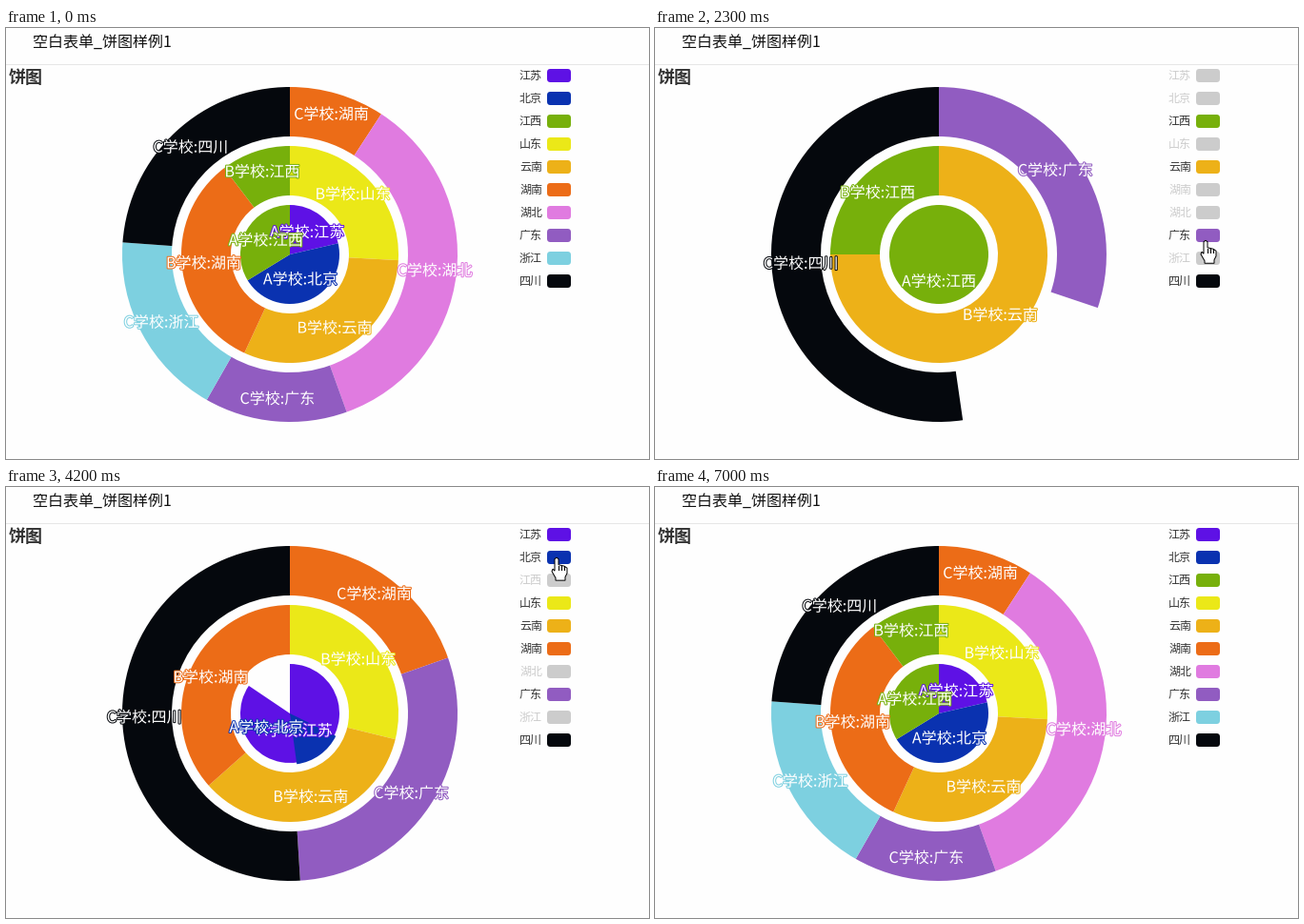
These frames come from a looping animation (675x453 px, 7.5 s). A matplotlib script:

```python
from itertools import groupby

import numpy as np
import matplotlib.pyplot as plt
from matplotlib.animation import FuncAnimation
from matplotlib.patches import FancyBboxPatch, Polygon, Wedge
from matplotlib.patheffects import Normal, Stroke

W, H, DPI = 675, 453, 72          # at 72 dpi one point is one pixel
STEP, LOOP = 100, 7500
CX, CY = 298, 238
DURATION = 300                    # of a pie update and of a hover swell
LAG = 60                          # delay of the hover behind the pointer
ENTER, LEAVE = 100, 7000
GREY = "#cccccc"

COLORS = {
    "江苏": "#5e11e5", "北京": "#0a32b0", "江西": "#77b00b", "山东": "#ebe818",
    "云南": "#edb118", "湖南": "#ec6c17", "湖北": "#e07be0", "广东": "#915cc1",
    "浙江": "#7dd0e0", "四川": "#05080d",
}
NAMES = list(COLORS)

# one pie per school, from the inside out
PIES = {
    "A学校": {"江苏": 77, "北京": 161.5, "江西": 121.5},
    "B学校": {"山东": 250, "云南": 300, "湖南": 317, "江西": 100},
    "C学校": {"湖南": 200, "湖北": 770, "广东": 300, "浙江": 390, "四川": 520},
}

# legend clicks, each toggling one name; the pointer and hovers follow from them
CLICKS = [
    (560, "江苏"), (1172, "北京"), (1480, "山东"), (1700, "湖南"), (1940, "湖北"),
    (2245, "浙江"), (2650, "湖南"), (2880, "山东"), (3100, "江西"), (3650, "江苏"),
    (4175, "北京"), (4720, "江西"), (5750, "湖北"), (6560, "浙江"),
]

ARROW = [(0, 0), (0, 16.5), (4, 13), (6.6, 19), (9, 18), (6.4, 12.2), (11.5, 12)]
HAND = [(-2, 1), (0, -0.5), (2, 1), (2, 7), (8, 8.5), (11, 10.5), (11, 16), (9, 20),
        (9, 23.5), (-1, 23.5), (-1, 21), (-5, 14), (-4, 11.5), (-2, 13.5)]


def cubic_out(k):
    return 1 - (1 - min(max(k, 0), 1)) ** 3


def elastic_out(k):
    if k <= 0 or k >= 1:
        return float(k >= 1)
    return 1 + 2 ** (-10 * k) * np.sin((k - 0.1) * 2 * np.pi / 0.4)


def lift(color):
    rgb = [int(color[i:i + 2], 16) for i in (1, 3, 5)]
    return tuple(min(c * 1.1, 255) / 255 for c in rgb)


def row_y(name):
    return 50 + 24 * NAMES.index(name)


def radii(level):
    return 62 * level, 62 * level + 52


# --- pies ---

def layout(level, values, on):
    """Start angle, end angle and label centre of every visible slice."""
    shown = {n: v for n, v in values.items() if n in on}
    total, start, out = sum(shown.values()), 0, {}
    d = sum(radii(level)) / 2 + 3
    for name, v in shown.items():
        end = start + 360 * v / total
        mid = np.radians((start + end) / 2)
        out[name] = np.array([start, end, CX + d * np.sin(mid), CY - d * np.cos(mid)])
        start = end
    return out


def layouts(on):
    return [layout(i, values, on) for i, values in enumerate(PIES.values())]


def blend(prev, goal, k):
    return {n: prev.get(n, g[[0, 0, 2, 3]]) * (1 - k) + g * k for n, g in goal.items()}


def build_stages():
    """For each click: time, visible names, and per pie the old pose and goal."""
    on = set(NAMES)
    stages = [(-DURATION, set(on), layouts(on), layouts(on))]
    for t, name in CLICKS:
        t0, _, prev, goal = stages[-1]
        k = cubic_out((t - t0) / DURATION)
        on ^= {name}
        stages.append((t, set(on), [blend(p, g, k) for p, g in zip(prev, goal)],
                       layouts(on)))
    return stages


# --- pointer and hovers ---

STOPS = [(ENTER, 619, 53), *((t, 578, row_y(n)) for t, n in CLICKS), (LEAVE, 604, 226)]


def pointer(t):
    """Leave a stop soon after its click and glide to the next one."""
    i = min(sum(s[0] <= t for s in STOPS[1:]), len(STOPS) - 2)
    (t0, *p), (t1, *q) = STOPS[i:i + 2]
    k = np.clip((t - t0 - 20) / (0.53 * (t1 - t0)), 0, 1)
    return np.array(p) + (np.array(q) - p) * np.sin(k * np.pi / 2)


def row_at(x, y, reach):
    return next((n for n in NAMES if x < 595 and abs(y - row_y(n)) < reach), None)


def hot_name(t):
    name = row_at(*pointer(t - LAG), 9.5)
    clicked = [n for c, n in CLICKS if c <= t]
    return None if clicked and clicked[-1] == name else name


HOVERS = []                       # name, start, end
for hot, run in groupby(range(ENTER, LEAVE, 4), hot_name):
    run = list(run)
    if hot:
        HOVERS.append((hot, run[0], run[-1] + 4))


def hovered(name, t):
    return any(n == name and a <= t < b for n, a, b in HOVERS)


def swell(name, t):
    """Extra radius from the latest hover of a name."""
    past = [(a, b) for n, a, b in HOVERS if n == name and a <= t]
    if not past:
        return 0
    a, b = past[-1]
    grown = 10 * elastic_out((min(t, b) - a) / DURATION)
    return grown * (1 - elastic_out((t - b) / DURATION))


# --- drawing ---

STAGES = build_stages()
plt.rcParams["font.family"] = ["Noto Sans CJK JP"]
fig = plt.figure(figsize=(W / DPI, H / DPI), dpi=DPI, facecolor="#fefefe")
ax = fig.add_axes([0, 0, 1, 1])
ax.set(xlim=(0, W), ylim=(H, 0))
ax.axis("off")
live = []


def text(x, cy, s, size, **kw):
    return ax.text(x, cy + 0.38 * size, s, fontsize=size, va="baseline", **kw)


def add(patch):
    live.append(ax.add_patch(patch))


text(28, 14, "空白表单_饼图样例1", 16, color="#111111")
text(3, 51, "饼图", 18, color="#333333", weight="bold")
ax.plot([0, W], [37.5, 37.5], color="#e6e6e6", lw=1)


def draw_pies(t, stage):
    t0, _, prev, goals = stage
    k = cubic_out((t - t0) / DURATION)
    bound = set()                 # a legend entry drives only its first pie
    for level, (school, values) in enumerate(PIES.items()):
        r0, r = radii(level)
        goal = goals[level]
        for name, (a, b, x, y) in blend(prev[level], goal, k).items():
            color = fill = COLORS[name]
            radius = r
            if name not in bound:
                radius += swell(name, t)
                if hovered(name, t):
                    fill = lift(color)
                    a, b = goal[name][:2]
            if b - a > 0.01:
                add(Wedge((CX, CY), radius, a - 90, b - 90, width=radius - r0,
                          fc=fill, lw=0, zorder=1))
            live.append(text(x, y - 1.5, f"{school}:{name}", 16, color="white",
                             ha="center", zorder=3,
                             path_effects=[Stroke(linewidth=2, foreground=color),
                                           Normal()]))
        bound |= set(values)


def draw_legend(t, on):
    for name in NAMES:
        y = row_y(name)
        color = COLORS[name] if name in on else GREY
        add(FancyBboxPatch((568, y - 7), 25, 14, boxstyle="round,pad=0,rounding_size=3.5",
                           fc=lift(color) if hovered(name, t) else color, lw=0, zorder=2))
        live.append(text(563, y - 1, name, 12, ha="right", zorder=2,
                         color="#333333" if name in on else GREY))


def draw_pointer(t):
    if not ENTER <= t < LEAVE:
        return
    x, y = pointer(t)
    hand = row_at(x, y, 8)
    add(Polygon(np.array(HAND if hand else ARROW) + (x, y), fc="white", ec="black",
                lw=1, zorder=5))
    if hand:
        for dx in (2, 5, 8):
            live.extend(ax.plot([x + dx] * 2, [y + 8, y + 12], color="black", lw=1,
                                zorder=6))


def draw(i):
    while live:
        live.pop().remove()
    t = i * STEP
    stage = [s for s in STAGES if s[0] <= t][-1]
    draw_pies(t, stage)
    draw_legend(t, stage[1])
    draw_pointer(t)
    return []


anim = FuncAnimation(fig, draw, frames=LOOP // STEP, interval=STEP, repeat=True,
                     repeat_delay=0, init_func=lambda: [])
plt.show()
```
